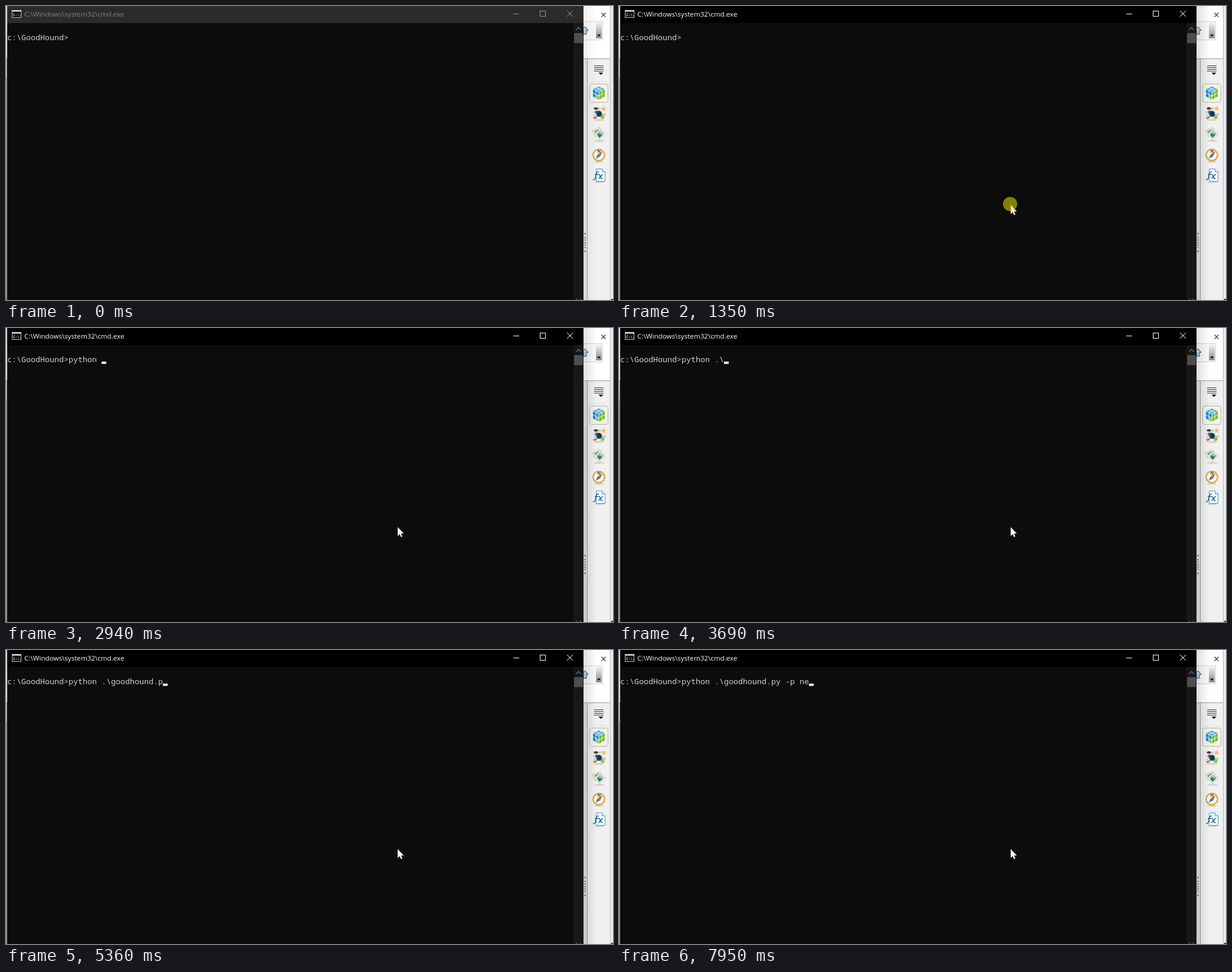
An HTML page that plays this animation: 1029x499 px, repeating every 8000 ms.

```html
<!DOCTYPE html>
<html lang="en">
<head>
<meta charset="utf-8">
<title>Command prompt</title>
<style>
  html, body { margin: 0; width: 100%; height: 100%; overflow: hidden; background: #fff; }
  svg { display: block; width: 1029px; height: 499px; }
  text { white-space: pre; }
  .console { font: 13.333px "Noto Sans Mono", monospace; fill: #d0cfc6; }
  .title { font: 11.63px "Open Sans", sans-serif; fill: #818783; }
  .bar { fill: #2b2b2b; }
  .buttons { fill: none; stroke: #9a9a9a; }
  .shadow { opacity: .4; }
  .active .bar { fill: #000; }
  .active .title { fill: #fff; }
  .active .buttons { stroke: #fff; }
  .active .shadow { opacity: .8; }
</style>
</head>
<body>
<svg id="stage" viewBox="0 0 1029 499">
  <defs>
    <linearGradient id="shade"><stop stop-opacity=".16"/><stop offset="1" stop-opacity="0"/></linearGradient>
    <linearGradient id="grip" x2="0" y2="1"><stop stop-color="#f2f2f2"/><stop offset="1" stop-color="#8d8d8d"/></linearGradient>
    <path id="arrow" d="M0 0V15L3.4 11.7 5.8 17 7.9 16.1 5.6 10.8H10.4Z"/>
    <clipPath id="arrowClip"><use href="#arrow" x="664" y="338"/></clipPath>
  </defs>

  <!-- Window behind -->
  <rect width="1029" height="499" fill="#fff"/>
  <path d="M0 0h2v89H0Z" fill="#d9d9d9"/>
  <path d="M0 89h1v33H0Z" fill="#e4e4e4"/>
  <path d="M1 89h1v33H1Z" fill="#777"/>
  <path d="M0 122h2v377H0Z" fill="#8c8c8c"/>
  <path d="M0 89.5h2M0 122.5h2" stroke="#777"/>
  <path d="M979 90h45v409h-45Z" fill="#f0f0f0"/>
  <path d="M979 90h6v409h-6Z" fill="#e6e6e6"/>
  <path d="M979 89.5h45M985.5 90V499" stroke="#9b9b9b" fill="none"/>
  <path d="M1025 0h4v499h-4Z" fill="#ececec"/>
  <path d="M1024.5 0V499" stroke="#b5b5b5"/>
  <path d="M1026 497h3v2h-3Z" fill="#333"/>
  <path d="M1009.5 11.5l7 7M1016.5 11.5l-7 7" stroke="#444" stroke-width="1.4"/>
  <path d="M979 26.5h32.5v31H979" fill="#fafafa" stroke="#d2d2d2"/>
  <rect x="1000" y="28" width="10" height="27" fill="url(#grip)"/>
  <path d="M1002 48.5h6l-3 3.5Z"/>
  <path d="M975.5 41.5l6-6.5 5.5 6.5h-3v6.5h-5v-6.5Z" fill="#b9d8ee" stroke="#1f4e79"/>

  <!-- Splitter handle -->
  <g fill="#666">
    <path d="M980.5 384.5l3 1.7-3 1.8ZM980.5 414.5l3 1.7-3 1.8Z"/>
    <path d="M981.5 392v19" stroke="#666" stroke-width="2" stroke-dasharray="2 2.2"/>
  </g>

  <!-- Sidebar -->
  <path d="M997 101.5h16M997 104.5h16M997 107.5h16M997 110.5h16" stroke="#333"/>
  <path d="M1004.5 113h8l-4 4Z"/>
  <path d="M993 128.5h25" stroke="#e0e0da"/>
  <rect x="989.5" y="132.5" width="31" height="31" rx="3" fill="#f3f1eb" stroke="#b5b1a2"/>
  <g>
    <path d="M1005 136.5l10 4.5-10 5-10-5Z" fill="#4cb4e0"/>
    <path d="M995 141l10 5v13l-10-5.5Z" fill="#168ad2"/>
    <path d="M1015 141l-10 5v13l10-5.5Z" fill="#74b92c"/>
    <path d="M1000 150l5 2.5v6.5l-5-2.7Z" fill="#93cb48"/>
    <path d="M1000 138.7l10 4.8v13M1010 138.7l-10 4.8v13M995 147.5l10 5 10-5M995 141l10 5 10-5M1005 146v13" fill="none" stroke="#f3f1eb"/>
  </g>
  <g fill="#c2c2bc" opacity=".75">
    <ellipse cx="1005" cy="193.5" rx="9" ry="1.4"/><ellipse cx="1006" cy="229" rx="9" ry="1.4"/>
    <ellipse cx="1005" cy="264.5" rx="8" ry="1.4"/><ellipse cx="1006" cy="299" rx="9" ry="1.4"/>
  </g>
  <g>
    <path d="M995 179h3v3h-3ZM1013 182h4v4h-4ZM996 184h3v3h-3ZM1004 172h4v4h-4Z" fill="#b9d3e4"/>
    <path d="M1013 169.5l1.4 3 3.4.4-2.5 2.2.7 3.4-3-1.7-3 1.7.7-3.4-2.5-2.2 3.4-.4Z" fill="#f5bd68"/>
    <circle cx="1000" cy="175" r="2.8" fill="#efad4b"/>
    <path d="M996 173.5q4-3.5 8 0l-1 2-6-.5Z" fill="#433527"/>
    <path d="M998 179q7-3 12 1l1 7-9 1Z" fill="#1769a6"/>
    <path d="M1002 180l5-2 4 9-7 1Z" fill="#29323a"/>
    <path d="M1009 185l4-1 2 6q-3 3-7 1Z" fill="#8cc63f"/>
    <path d="M995 189l6-2 1 3-5 2Z" fill="#dc6e28"/>
  </g>
  <g stroke-width=".8" stroke="#a1a99c">
    <path d="M994 212l12-6 3 4-10 12Z" fill="#fff"/>
    <path d="M996.5 212.5l8.5-4 2 3-7 7Z" fill="#80b94b" stroke="none"/>
    <path d="M998 217l9-8 9 8-10 10Z" fill="#fff"/>
    <path d="M1000.5 217l6.5-5.5 6.5 5.5-7.5 7Z" fill="#75b8d2" stroke="none"/>
    <path d="M1002 218.5l4-2 5 3-5 4.5Z" fill="#4b7a3e" stroke="none"/>
    <circle cx="1008" cy="215.5" r="1.2" fill="#f8e16a" stroke="none"/>
  </g>
  <g>
    <circle cx="1005" cy="253" r="9.6" fill="#fffaf0" stroke="#dfa041" stroke-width="2.3"/>
    <text x="1002.5" y="249" font-family="Open Sans, sans-serif" font-size="7" font-weight="700" fill="#333">N</text>
    <path d="M1011 247l-3.8 8.5-4-4Z" fill="#b96b22"/>
    <path d="M999.5 259l3.7-7.5 4 4Z" fill="#397fae"/>
  </g>
  <g fill="none" stroke="#3f9bd0">
    <path d="M1000.5 276.5h10l5 5v16h-15Z" fill="#fff"/>
    <path d="M1010.5 276.5v5h5" fill="#dff0fa"/>
    <path d="M995 294.5q3.3 1 4.2-3l1.8-7q1-4 4-2.5M998 286h6M1004.5 285.5q2 0 3 4t3.8 3.5M1011.5 285.5l-7 7.5" stroke="#165f91" stroke-width="1.5"/>
  </g>

  <!-- Console window -->
  <rect class="shadow" x="979" width="22" height="499" fill="url(#shade)"/>
  <rect x="2" width="977" height="499" fill="#0c0c0c"/>
  <rect class="bar" x="2" width="977" height="29"/>
  <rect x="10.5" y="7.5" width="15" height="12" fill="#000" stroke="#c9c9c9"/>
  <path d="M10 8.5h16" stroke="#e8e8e8" stroke-width="2"/>
  <text x="12" y="17" font-family="DejaVu Sans Mono, monospace" font-size="6" font-weight="700" fill="#fff">C:\.</text>
  <text class="title" x="31" y="18">C:\Windows\system32\cmd.exe</text>
  <g class="buttons">
    <path d="M860 13.5h10"/>
    <rect x="905.5" y="8.5" width="9" height="9"/>
    <path d="M951 8l10 10M961 8l-10 10"/>
  </g>
  <rect x="962" y="29" width="17" height="470" fill="#171717"/>
  <rect x="963" y="46" width="15" height="17" fill="#4d4d4d"/>
  <path d="M966.5 40.5l4-4 4 4M966.5 497.5l4 4 4-4" fill="none" stroke="#737373" stroke-width="1.3"/>
  <text class="console" id="line" x="2" y="58"></text>
  <rect id="caret" y="57" width="8" height="4" fill="#f2f2f2"/>
  <circle class="click" cx="663" cy="336" r="12" fill="#828008"/>
  <use id="pointer" href="#arrow" fill="#fff"/>
  <circle class="click" cx="663" cy="336" r="12" fill="#ffdc9c" clip-path="url(#arrowClip)"/>
</svg>
<script>
const LOOP = 8000;
const PROMPT = "c:\\GoodHound>";
const COMMAND = "python .\\goodhound.py -p ne";
const CELL = 8, COMMAND_X = 106;

// Time at which each character of COMMAND appears.
const keyTimes = [
  2210, 2310, 2410, 2540, 2610, 2740, 2940,
  3590, 3690, 4020, 4090, 4220, 4290,
  4620, 4690, 4820, 4890, 5020, 5160, 5360, 5690,
  6630, 6830, 7230, 7490, 7690, 7950
];
// Spans in which the caret is blinked off.
const caretGaps = [
  [0, 1880], [3490, 3590], [3950, 4020], [4490, 4620],
  [5020, 5160], [5560, 5690], [6100, 6630], [7160, 7230]
];

const stage = document.getElementById("stage");
const line = document.getElementById("line");
const caret = document.getElementById("caret");
const pointer = document.getElementById("pointer");
const clicks = document.querySelectorAll(".click");
const within = (t, from, to) => t >= from && t < to;
const show = (el, on) => el.setAttribute("visibility", on ? "visible" : "hidden");

function draw(t) {
  const typed = keyTimes.filter(time => time <= t).length;
  line.textContent = PROMPT + COMMAND.slice(0, typed);
  caret.setAttribute("x", COMMAND_X + CELL * typed);
  show(caret, !caretGaps.some(([from, to]) => within(t, from, to)));

  const arrived = t >= 1080;
  pointer.setAttribute("x", arrived ? 664 : 860);
  pointer.setAttribute("y", arrived ? 338 : 423);
  show(pointer, t >= 1010);

  stage.classList.toggle("active", t >= 1350);
  clicks.forEach(el => show(el, within(t, 1350, 1550)));
}

const start = performance.now();
function tick() {
  draw((performance.now() - start) % LOOP);
  requestAnimationFrame(tick);
}
tick();
</script>
</body>
</html>
```
